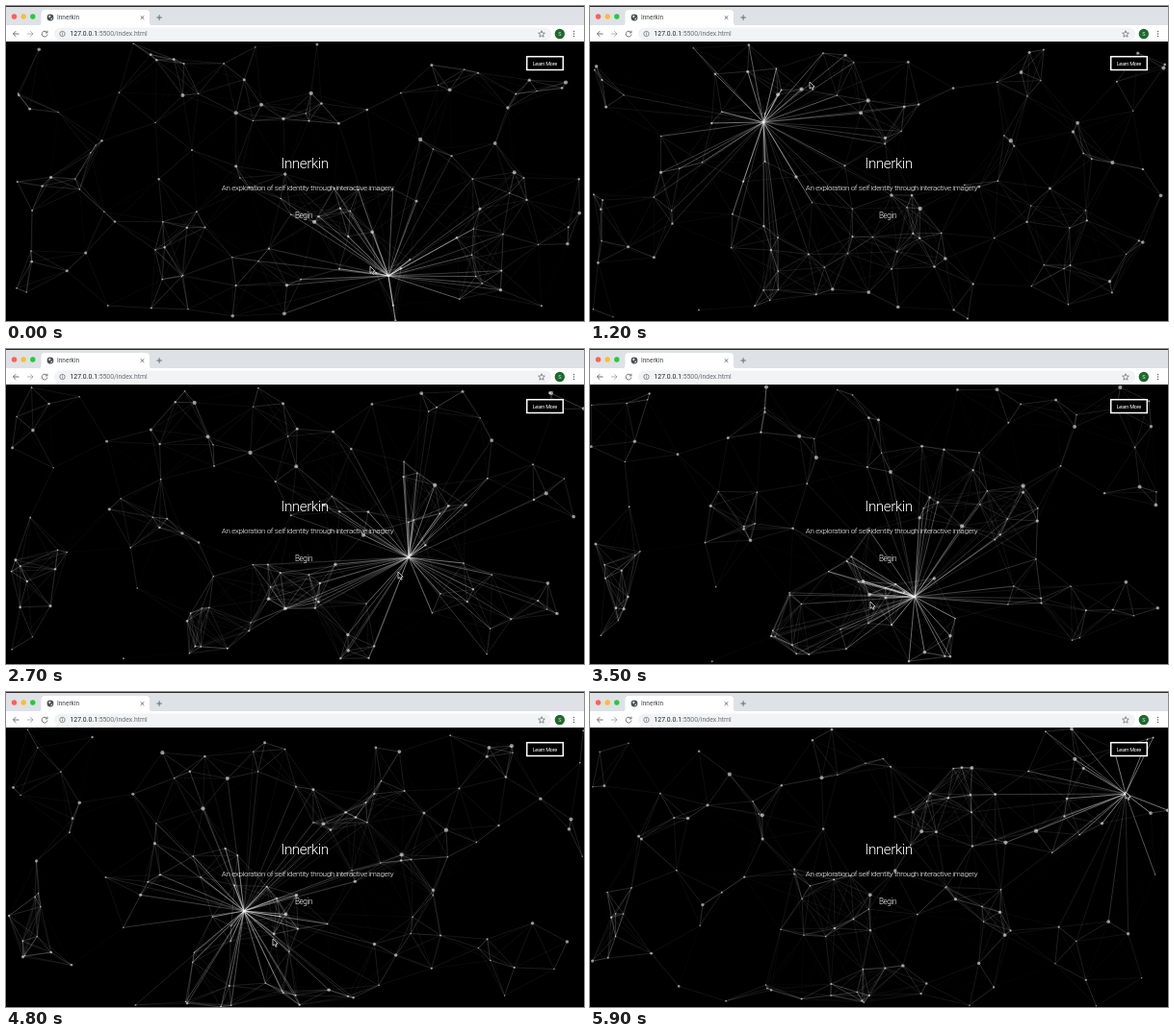
An HTML page with a canvas that plays this animation: 600x328 px, repeating every 6000 ms.

```html
<!DOCTYPE html>
<html lang="en">
<head>
<meta charset="utf-8">
<title>Innerkin</title>
<style>
  html, body { margin: 0; width: 100%; height: 100%; overflow: hidden; background: #000; }
  canvas, svg { position: absolute; left: 0; top: 0; width: 600px; height: 328px; }
  text { font-family: Roboto, Inter, sans-serif; }
  .page text { fill: #fff; font-weight: 300; text-anchor: middle; }
  .icon { fill: none; stroke: #5f6368; stroke-width: .9; }
  .thin { stroke-width: .7; }
</style>
</head>
<body>
<canvas id="net" width="600" height="328"></canvas>
<svg viewBox="0 0 600 328">
  <g class="page">
    <text x="310" y="169" font-size="15.2" letter-spacing="-.45">Innerkin</text>
    <text x="313" y="192" font-size="8" letter-spacing="-.35">An exploration of self identity through interactive imagery</text>
    <text x="309" y="221" font-size="8.2" letter-spacing="-.4">Begin</text>
    <rect x="540.7" y="52.7" width="37.6" height="13.8" fill="#000" stroke="#fff" stroke-width="1.5"/>
    <text x="559.3" y="62" font-size="5.6" letter-spacing="-.3" style="font-weight:400">Learn More</text>
  </g>

  <rect width="600" height="37" fill="#dee1e6"/>
  <rect width="600" height="1" fill="#2a2a2a"/>
  <circle cx="8.5" cy="11" r="2.7" fill="#ff5f57"/>
  <circle cx="18.2" cy="11" r="2.7" fill="#febc2e"/>
  <circle cx="27.8" cy="11" r="2.7" fill="#28c840"/>
  <path d="M33 20.5Q36.5 20.5 36.5 17V8Q36.5 4 40.5 4H145Q149 4 149 8V17Q149 20.5 152.5 20.5z" fill="#fff"/>
  <rect y="20" width="600" height="17" fill="#fff"/>
  <circle cx="46" cy="12" r="3.4" fill="#4a4d51"/>
  <path d="M44 10.5l2-1 .5 1.500-1.500 1.500zM46.500 13l1.800-.8-.6 1.900-1.200.5z" fill="#dfe1e4"/>
  <text x="53" y="14.200" font-size="6.500" fill="#3c4043">Innerkin</text>
  <path class="icon" d="M139.700 10.300l3.600 3.600m0-3.600l-3.600 3.600M156.300 12h5.600m-2.800-2.800v5.600"/>
  <path class="icon" d="M13.500 29H7.500m2.800-2.900L7.400 29l2.900 2.900"/>
  <path class="icon" d="M22 29h6m-2.800-2.900L28.100 29l-2.900 2.900" opacity=".55"/>
  <path class="icon" d="M42.300 27.200a2.900 2.900 0 1 0 .7 2.300M43 25.700v2.200h-2.200"/>
  <rect x="50" y="22.500" width="516" height="13" rx="6.500" fill="#f1f3f4"/>
  <path class="icon thin" d="M55.800 29a2.700 2.700 0 1 0 5.400 0a2.700 2.700 0 1 0-5.400 0M58.500 28.500v2m0-3.300v.7"/>
  <text x="66.500" y="31.300" font-size="6.850" fill="#202124">127.0.0.1<tspan fill="#6b6f74">:5500/index.html</tspan></text>
  <path class="icon thin" d="M556 25.700l.9 2.300 2.500.2-1.900 1.600.6 2.400-2.100-1.300-2.100 1.300.6-2.400-1.900-1.600 2.500-.2z"/>
  <circle cx="574.800" cy="29" r="5.200" fill="#1c6b2c"/>
  <text x="574.800" y="31" font-size="5.500" fill="#d5e6d8" text-anchor="middle">S</text>
  <path d="M589.500 26.600v0M589.500 29v0M589.500 31.400v0" stroke="#5f6368" stroke-width="1.500" stroke-linecap="round"/>

  <path id="cursor" d="M0 0V7.200L1.700 5.700 2.900 8.300 4.100 7.800 3 5.300 5.200 5.200z" fill="#000" stroke="#fff" stroke-width=".7"/>
</svg>
<script>
const W = 600, H = 328, TOP = 38, LOOP = 6000, STEP = 100;
const COLS = 14, ROWS = 9, SPEED = 24;
const LINK = 74, GRAB = 185, LAG = 0.1;
const ctx = document.getElementById('net').getContext('2d');
const cursor = document.getElementById('cursor');

// Pointer path: seconds, x, y
const path = [
  [-0.1, 397, 281], [0, 380, 275], [1.1, 180, 121], [1.2, 230, 83],
  [1.8, 412, 142], [1.9, 419, 170], [2.6, 418, 217], [2.7, 409, 236],
  [3.4, 337, 258], [3.5, 293, 267], [4.7, 247, 228], [4.8, 279, 261],
  [5.8, 556, 106], [5.9, 558, 108]
];

let seed = 41;
const rand = () => (seed = (seed * 16807) % 2147483647) / 2147483647;
const spread = n => (rand() * 2 - 1) * n;

// A loosely scattered grid covers the page evenly but still clusters
const dots = Array.from({ length: COLS * ROWS }, (_, i) => ({
  x: (i % COLS + 0.5 + spread(1.3)) * W / COLS,
  y: TOP + (Math.floor(i / COLS) + 0.5 + spread(1.3)) * (H - TOP) / ROWS,
  vx: spread(SPEED),
  vy: spread(SPEED),
  r: 0.7 + 1.5 * rand() ** 2
}));

function bounce(v, lo, hi) {
  const n = hi - lo;
  const m = (((v - lo) % (2 * n)) + 2 * n) % (2 * n);
  return lo + (m > n ? 2 * n - m : m);
}

function slope(i, k) {
  const a = path[Math.max(i - 1, 0)], b = path[Math.min(i + 1, path.length - 1)];
  return (b[k] - a[k]) / (b[0] - a[0]);
}

// Smooth cubic through the path points
function pointer(t) {
  let i = 0;
  while (i < path.length - 2 && t >= path[i + 1][0]) i++;
  const a = path[i], b = path[i + 1], h = b[0] - a[0], u = (t - a[0]) / h, v = 1 - u;
  const at = k =>
    v * v * ((1 + 2 * u) * a[k] + u * h * slope(i, k)) +
    u * u * ((1 + 2 * v) * b[k] - v * h * slope(i + 1, k));
  return { x: at(1), y: at(2) };
}

function line(a, b, reach, strength) {
  const d = Math.hypot(a.x - b.x, a.y - b.y);
  if (d >= reach) return;
  ctx.globalAlpha = strength * (1 - d / reach);
  ctx.beginPath();
  ctx.moveTo(a.x, a.y);
  ctx.lineTo(b.x, b.y);
  ctx.stroke();
}

function draw(ms) {
  // The picture rests between 0.2 s and 0.7 s
  const held = ms < 700 ? Math.min(ms, 200) : ms;
  const t = Math.floor(held / STEP) * STEP / 1000;
  const hub = pointer(t - LAG), tip = pointer(t);
  const now = dots.map(d => ({
    x: bounce(d.x + d.vx * t, 0, W),
    y: bounce(d.y + d.vy * t, TOP, H),
    r: d.r
  }));

  ctx.globalAlpha = 1;
  ctx.fillStyle = '#000';
  ctx.fillRect(0, 0, W, H);
  ctx.strokeStyle = ctx.fillStyle = '#fff';
  now.forEach((p, i) => {
    ctx.lineWidth = 0.6;
    for (const q of now.slice(i + 1)) line(p, q, LINK, 0.42);
    ctx.lineWidth = 0.7;
    line(p, hub, GRAB, 0.9);
  });
  ctx.globalAlpha = 0.55;
  for (const p of now) {
    ctx.beginPath();
    ctx.arc(p.x, p.y, p.r, 0, 2 * Math.PI);
    ctx.fill();
  }
  cursor.setAttribute('transform', `translate(${tip.x - 2} ${tip.y - 4})`);
}

const start = performance.now();
function tick() {
  draw((performance.now() - start) % LOOP);
  requestAnimationFrame(tick);
}
tick();
</script>
</body>
</html>
```
